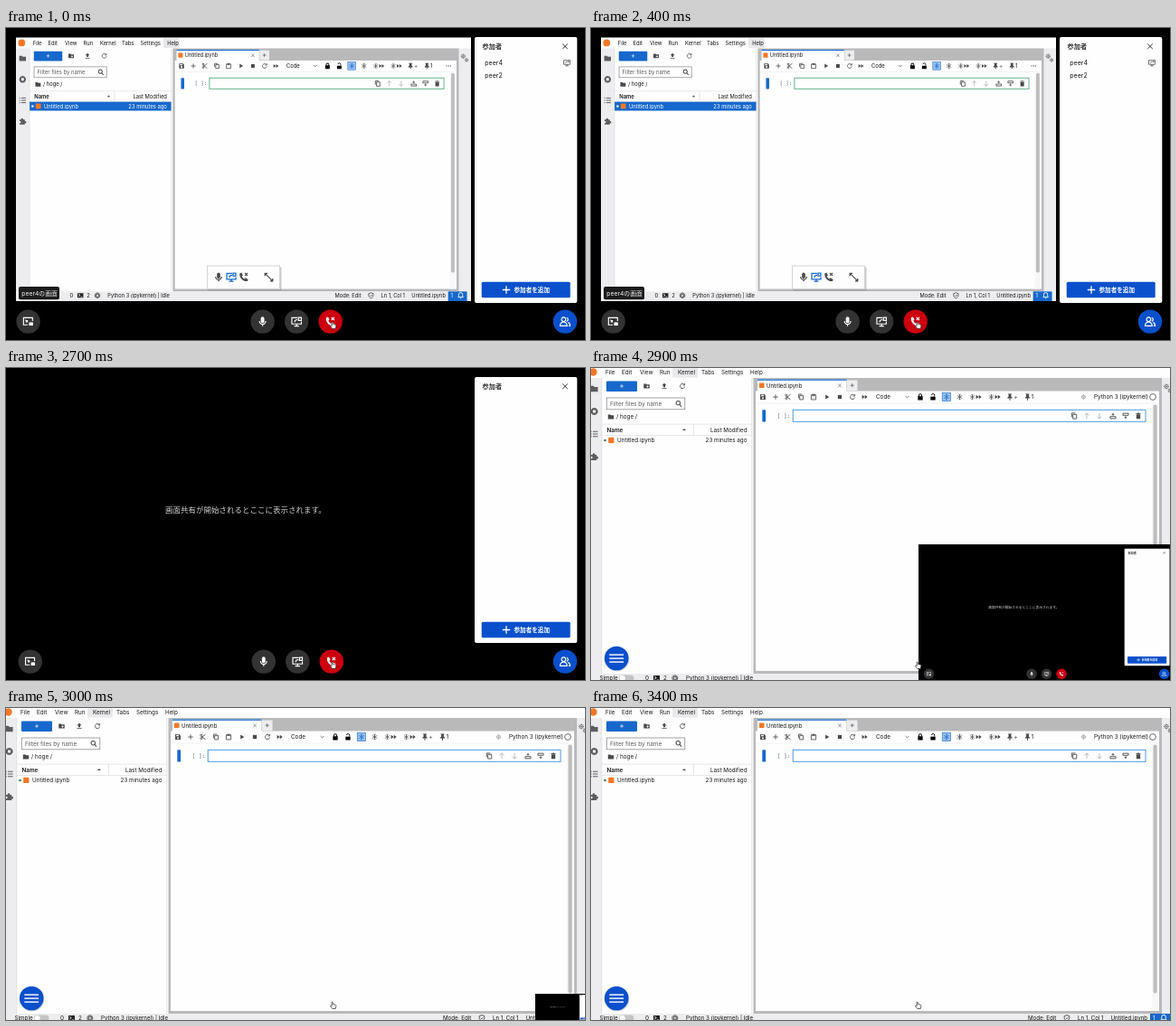
These frames come from a looping animation (640 by 345 pixels, 4 s). An HTML page:

```html
<!DOCTYPE html>
<html lang="ja">
<head>
<meta charset="utf-8">
<title>Screen sharing call</title>
<style>
html, body { margin: 0; width: 100%; height: 100%; overflow: hidden; background: #fefefe; }
svg { display: block; width: 100vw; height: 100vh; }
text { font-family: Inter, "Noto Sans CJK JP", "Noto Sans CJK", sans-serif; white-space: pre; }
#call { animation: call 4s step-end infinite; }
#win { transform-origin: 646px 349px; animation: shrink 4s step-end infinite; }
@keyframes call {
  0% { opacity: 1; }
  67.5%, 100% { opacity: 0; }
}
@keyframes shrink {
  0% { opacity: 0; transform: scale(1); }
  67.5% { opacity: 1; transform: scale(1); }
  70% { opacity: 1; transform: scale(.8436); }
  72.5% { opacity: 1; transform: scale(.44); }
  75% { opacity: 1; transform: scale(.0946); }
  77.5%, 100% { opacity: 0; transform: scale(.0946); }
}
</style>
</head>
<body>
<svg viewBox="0 0 640 345" preserveAspectRatio="none">
  <defs>
    <clipPath id="screen"><rect x="11" y="10.5" width="503" height="291.5"/></clipPath>
  </defs>
  <g id="desk"></g>
  <g id="call"></g>
  <g id="win"></g>
  <g id="hand"></g>
</svg>
<script>
const INK = '#4a4a4a', DIM = '#b4b4b4', SIDE = '#5c5c5c', TEXT = '#151515', WHITE = '#fefefe',
      PALE = '#ededf0', LINE = '#d8d8d8', GRAY = '#b9b9b9',
      BLUE = '#1668cc', DEEP = '#0a50cc', ORANGE = '#f37726';

// Icons live in a 10 unit box around the origin; "s" is stroked, "f" is filled.
const ICONS = {
  folder: { f: 'M-5-4h4l1.3 1.4h4.7v6.6h-10z' },
  addFolder: { f: 'M-5-4h4l1.3 1.4h4.7v6.6h-10zM1-1v1.3h-1.3v1.2h1.3v1.3h1.2v-1.3h1.3v-1.2h-1.3v-1.3z' },
  run: { f: 'M0-5a5 5 0 1 0 .01 0zM-2-2h4v4h-4z' },
  list: { s: 'M-2-3.5h7M-2 0h7M-2 3.5h7M-5-3.5h1.5M-5 0h1.5M-5 3.5h1.5' },
  puzzle: { f: 'M-4.5-2.5h2.3a1.6 1.6 0 1 1 3 0h2.5v2.5a1.6 1.6 0 1 1 0 3v2h-7.8v-2.3a1.5 1.5 0 1 0 0-2.8z' },
  upload: { f: 'M0-5l4 4h-2.4v3h-3.2v-3h-2.4zM-4 3.4h8v1.4h-8z' },
  refresh: { s: 'M3.2-2.4A4 4 0 1 0 4 .8M4-4.6v3h-3' },
  save: { f: 'M-4.5-4.5h7l2 2v7h-9zM-3-3.4v2.4h4.6v-2.4zM0 .2a1.6 1.6 0 1 0 .01 0z' },
  plus: { s: 'M0-4.2v8.4M-4.2 0h8.4' },
  cut: { s: 'M-3-1L4 4.5M-3 1L4-4.5M-3.4-4.3a1.5 1.5 0 1 0 .01 0M-3.4 1.3a1.5 1.5 0 1 0 .01 0' },
  copy: { s: 'M-4 2v-6.5h6M-2-2.5h6v7h-6z' },
  paste: { s: 'M-4-3.5h8v8h-8zM-2-4.4h4v2h-4z' },
  play: { f: 'M-2.8-4l6.4 4-6.4 4z' },
  stop: { f: 'M-3.3-3.3h6.6v6.6h-6.6z' },
  ff: { f: 'M-4.5-3.4l4.5 3.4-4.5 3.4zM.3-3.4l4.7 3.4-4.7 3.4z' },
  lock: { f: 'M-3.8-1h.9v-1.3a2.9 2.9 0 0 1 5.8 0v1.3h.9v6h-7.6zM-1.6-1h3.2v-1.3a1.6 1.6 0 0 0-3.2 0z' },
  unlock: { f: 'M-3.8-.5h7.6v5.5h-7.6z', s: 'M2.4-.5v-2a2.3 2.3 0 0 0-4.6-.4' },
  snow: { s: 'M0-4.6v9.2M-4-2.3l8 4.6M-4 2.3l8-4.6M-1.6-4l1.6 1.4 1.6-1.4M-1.6 4l1.6-1.4 1.6 1.4' },
  pin: { f: 'M-3-5h6v1.2h-1v3.2l1.8 1.8v1h-3.1v3h-1.4v-3h-3.1v-1l1.8-1.8v-3.2h-1z' },
  chev: { s: 'M-3-1.5l3 3 3-3' },
  caret: { f: 'M-4 2l4-4 4 4z' },
  search: { s: 'M-1-4.2a3.2 3.2 0 1 0 .01 0M1.4 1.4l3 3.2' },
  up: { s: 'M0 4.5v-9M-3.6-1l3.6-3.6 3.6 3.6' },
  down: { s: 'M0-4.5v9M-3.6 1l3.6 3.6 3.6-3.6' },
  above: { s: 'M-4.5 1h9v3.2h-9zM0-.5v-4M-2-2.5h4' },
  below: { s: 'M-4.5-1h9v-3.2h-9zM0 .5v4M-2 2.5h4' },
  trash: { f: 'M-3.2-2.4h6.4v7.2h-6.4zM-4-4.2h2.4l.6-.8h2l.6.8h2.4v1.2h-8z' },
  gear: { s: 'M0-3.2a3.2 3.2 0 1 0 .01 0M0-1a1 1 0 1 0 .01 0M0-5v1.6M0 3.4v1.6M-5 0h1.6M3.4 0h1.6M-3.5-3.5l1.1 1.1M2.4 2.4l1.1 1.1M-3.5 3.5l1.1-1.1M2.4-2.4l1.1-1.1' },
  term: { f: 'M-5-4h10v8h-10zM-3.6-2.4l2.2 2-2.2 2 .8.7 3-2.7-3-2.7zM.4 1.6v1h3v-1z' },
  chip: { s: 'M0-4a4 4 0 1 0 .01 0M-2-2h4v4h-4z' },
  shield: { s: 'M0-4.6l4 1.4v3c0 2.4-2 4-4 5-2-1-4-2.6-4-5v-3zM-1.7 0l1.4 1.4 2.4-2.7' },
  bell: { s: 'M-4 2.6h8l-1-1.6v-2.6a3 3 0 0 0-6 0v2.6zM-1 4.5h2' },
  close: { s: 'M-4-4l8 8M4-4l-8 8' },
  mic: { f: 'M-1.8-3.2a1.8 1.8 0 0 1 3.6 0v3a1.8 1.8 0 0 1-3.6 0z', s: 'M-3.3-.5a3.3 3.3 0 0 0 6.6 0M0 2.9v2' },
  share: { s: 'M1-4h-6v6.5h10v-2.5M-2.5 4.8h5M0 2.5v2.3M2-4.2h3v3h-3zM-2 .5c0-2 1-2.5 3-2.5' },
  hang: { f: 'M-4.6-4.2l2-.6 1.5 2.9-1.2 1c.6 1.4 1.6 2.4 2.9 3l1.2-1.2 2.8 1.6-.6 2c-4.6 1.2-9.6-4-8.6-8.7z', s: 'M1-4.5l3 3M4-4.5l-3 3' },
  people: { s: 'M-1.5-4.3a2.1 2.1 0 1 0 .01 0M-5 4.3c0-5 7-5 7 0zM1.6-4a2 2 0 0 1 0 3.8M3 .8c1.4.5 2 1.8 2 3.5h-1.5' },
  pip: { s: 'M4.5-.5v-3.5h-9.5v7.5h4.5M-3-1.8l2 2M-1-1.5v1.7h-1.7', f: 'M.8.8h4.2v3.4h-4.2z' },
  expand: { s: 'M-4.5-4.5l9 9M-4.5-1.5v-3h3M4.5 1.5v3h-3' }
};

const rect = (x, y, w, h, fill, more = '') =>
  `<rect x="${x}" y="${y}" width="${w}" height="${h}" fill="${fill}" ${more}/>`;
const disc = (x, y, r, fill, more = '') =>
  `<circle cx="${x}" cy="${y}" r="${r}" fill="${fill}" ${more}/>`;
const text = (x, y, s, size = 6.3, fill = TEXT, more = '') =>
  `<text x="${x}" y="${y + size * .36}" font-size="${size}" fill="${fill}" ${more}>${s}</text>`;
const group = (inner, attrs) => `<g ${attrs}>${inner}</g>`;
const END = 'text-anchor="end"', BOLD = 'font-weight="700"';

function icon(name, x, y, size = 6.5, color = INK, weight = 1.3) {
  const { s, f } = ICONS[name];
  return group(
    (f ? `<path d="${f}" fill="${color}" fill-rule="evenodd"/>` : '') +
    (s ? `<path d="${s}" fill="none" stroke="${color}" stroke-width="${weight}"/>` : ''),
    `transform="translate(${x} ${y}) scale(${size / 10})"`);
}

const row = (names, xs, y, size, color) =>
  names.split(' ').map((n, i) => icon(n, xs[i], y, size, color)).join('');

// Notebook app. pad widens the file panel, dx and dy move the right and bottom edges.
function lab({ pad = 0, dx = 0, dy = 0, shared = false }) {
  const right = 629 + dx, bottom = 337 + dy, dock = 179.5 + pad, mid = 342.8 + dy;
  const menu = [['File', 16], ['Edit', 34], ['View', 54], ['Run', 76], ['Kernel', 96],
                ['Tabs', 122], ['Settings', 144], ['Help', 176]];
  const hot = shared ? [171.5, 19] : [90, 28];

  const top = rect(-6, -4, 660, 360, WHITE) + rect(hot[0], -1, hot[1], 11.5, '#e9e9ec') +
    disc(2.5, 4.5, 4.2, ORANGE) +
    menu.map(([s, x]) => text(x, 4.8, s)).join('') +
    rect(-6, 11, 18, 340, PALE) + rect(11.6, 11, .6, 327, LINE) +
    ['folder', 'run', 'list', 'puzzle'].map((n, i) => icon(n, 3.6, 23 + 25 * i, 8, SIDE)).join('');

  const ink = shared ? '#fff' : TEXT;
  const files = rect(17, 14.5, 34, 11.5, BLUE, 'rx="1"') + icon('plus', 34, 20, 5, '#fff') +
    row('addFolder upload refresh', [61.5, 81, 101], 20) +
    rect(17.3, 33, 86.5, 12.8, '#fff', 'stroke="#8c8c8c" stroke-width=".8"') +
    text(21, 39.4, 'Filter files by name', 6.4, '#5a5a5a') + icon('search', 97, 39.4, 7, INK, 1.6) +
    icon('folder', 22, 54, 6.4) + text(28, 54, '/ hoge /') +
    rect(12, 61.8, 166 + pad, .6, LINE) + rect(12, 74.3, 166 + pad, .6, LINE) +
    rect(113, 62, .6, 12, LINE) +
    text(17.5, 68.3, 'Name', 6.3, TEXT, 'font-weight="600"') + icon('caret', 103 + pad, 68, 5) +
    text(172.5 + pad, 68.3, 'Last Modified', 6.3, TEXT, END) +
    (shared ? rect(12, 74.8, 166 + pad, 10.6, BLUE) : '') +
    disc(15.5, 80, 1.3, shared ? '#fff' : '#2f7d4a') +
    rect(19.2, 76.8, 6.2, 6.2, ORANGE, 'rx=".6"') + text(29, 80, 'Untitled.ipynb', 6.3, ink) +
    text(172.5 + pad, 80, '23 minutes ago', 6.3, ink, END) +
    rect(177.5 + pad, 11, .7, bottom - 11, LINE);

  const tools = rect(184, 12.5, 98.5, 13.5, WHITE) + rect(184, 12.5, 98.5, 1.3, BLUE) +
    rect(283, 13.5, 11.5, 11.5, PALE) +
    rect(186, 16.5, 5.5, 5.5, ORANGE, 'rx=".6"') + text(194, 19.4, 'Untitled.ipynb', 6) +
    icon('close', 275, 19.4, 4.5) + icon('plus', 288.7, 19.2, 5) +
    row('save plus cut copy paste play stop refresh ff', [190, 204, 218, 232, 246, 261, 275, 289, 302.5], 32) +
    text(315, 32, 'Code') + icon('chev', 349.5, 32, 6) +
    icon('lock', 364, 32, 7, '#000') + icon('unlock', 378, 32, 7, '#000') +
    rect(388.2, 27.2, 9.4, 9.4, '#9cc3f0', `stroke="${BLUE}" stroke-width=".6"`) +
    icon('snow', 393, 32, 7, BLUE, 1) + icon('snow', 407.5, 32, 7, INK, 1) +
    icon('snow', 421.5, 32, 6.5, INK, 1) + icon('ff', 428.5, 32, 6.5) +
    icon('snow', 442.5, 32, 6.5, INK, 1) + icon('ff', 449.5, 32, 6.5) +
    icon('pin', 463, 32, 7) + icon('plus', 469.5, 32.5, 4) +
    icon('pin', 482.5, 32, 7) + text(486.5, 32, '1');

  const edge = right - pad, cellEnd = edge - 16;
  const cell = rect(189.3, 46.3, 3.8, 13.2, BLUE, 'rx=".8"') +
    text(205.5, 53, '[ ]:', 6.2, '#56687c', 'style="font-family:\'DejaVu Sans Mono\',monospace"') +
    rect(223.2, 46.3, cellEnd - 223.2, 13, WHITE,
      `stroke="${shared ? '#58b07f' : '#4a9be0'}" stroke-width="1"`) +
    row('copy above below trash', [79, 36, 22, 8].map(d => cellEnd - d), 53, 6.8) +
    row('up down', [65, 51].map(d => cellEnd - d), 53, 6.8, DIM) +
    rect(edge - 9, 39, 6.5, bottom - 41, '#f7f7f7') +
    rect(edge - 7.5, 40.5, 4.2, 275 + dy, '#bdbdbd', 'rx="2"');

  const kernel = shared
    ? [0, 2.4, 4.8].map(d => disc(506 + d, 32, .7, INK)).join('')
    : icon('gear', 544.5, 32, 5.5, '#8f8f8f') + text(556, 32, 'Python 3 (ipykernel)') +
      disc(621, 32, 3.4, 'none', `stroke="${INK}" stroke-width=".8"`);

  const main = rect(dock, 11, right + 2 - dock, bottom + 1 - 11, GRAY) +
    rect(dock + 2.5, 25.5, right - dock - 3.5, bottom - 27.5, WHITE) +
    rect(dock + 2.5, 38.8, right - dock - 3.5, .5, '#e4e4e4') +
    group(tools + cell + kernel, `transform="translate(${pad} 0)"`) +
    rect(right + 2, 11, 20, bottom - 10, PALE) +
    icon('gear', 636 + dx, 20.5, 6, SIDE) + icon('gear', 640 + dx, 25, 5, SIDE);

  const status = rect(-6, bottom + 1, 660, 16, PALE) +
    text(9.5, mid, 'Simple', 6.3) +
    rect(31, mid - 3.2, 16.5, 7, '#c4c4c4', 'rx="3.5"') + disc(34.7, mid + .3, 3, '#fff') +
    text(60, mid, '0') + icon('term', 72.5, mid, 7, '#222') + text(80, mid, '2') +
    icon('chip', 92.8, mid, 7.5) + text(105, mid, 'Python 3 (ipykernel) | Idle', 6.1) +
    group(text(483, mid, 'Mode: Edit', 6.2) + icon('shield', 526, mid, 7) +
      text(538, mid, 'Ln 1, Col 1', 6.1) + text(574.5, mid, 'Untitled.ipynb', 6.2) +
      rect(618, bottom + 1, 22.5, 12.5, BLUE) + text(621, mid, '1', 6.3, '#fff') +
      icon('bell', 633, mid, 7.5, '#fff'), `transform="translate(${dx} 0)"`);

  return top + files + main + status;
}

const round = (name, x, fill, size = 10.5) =>
  disc(x, 324.6, 13.2, fill) + icon(name, x, 324.6, size, '#fff', 1.1);

// Call screen: dark stage, participant panel and round buttons.
function callScreen(content, members, xs) {
  const dark = '#333';
  return rect(0, 0, 640, 345, '#000') + content +
    rect(518, 10, 113.3, 294, WHITE, 'rx="2"') +
    text(526.5, 20.8, '参加者', 7.2, '#333', BOLD) + icon('close', 618, 20.3, 7, '#333', 1.4) +
    members.map((m, i) => text(529.3, 38.5 + 14 * i, m, 7)).join('') +
    (members.length ? icon('share', 620, 38.5, 7, INK, 1.1) : '') +
    rect(525.7, 280.7, 98, 17.6, DEEP, 'rx="1.5"') + icon('plus', 553, 289.5, 10, '#fff', 1.3) +
    text(561.5, 289.6, '参加者を追加', 6.6, '#fff', BOLD) +
    round('pip', xs[0], dark) + round('mic', xs[1], dark) + round('share', xs[2], dark) +
    round('hang', xs[3], '#cc000e') + round('people', 618, DEEP, 11);
}

const popup = rect(223.5, 264.5, 81, 26, '#808080', 'opacity=".4"') +
  rect(222.5, 263, 80, 25.5, WHITE, 'stroke="#d4d4d4" stroke-width="1"') +
  icon('mic', 235, 275.4, 10) + icon('share', 249, 275.4, 10, BLUE) +
  icon('hang', 263, 275.4, 10) + icon('expand', 290.5, 275.6, 9.5);

const shared = group(
  group(lab({ pad: 3.2, dx: -107, dy: -37, shared: true }), 'transform="translate(15 12.3) scale(.927)"') + popup,
  'clip-path="url(#screen)"') +
  rect(14, 286, 45, 14.3, '#1c1c1c', 'rx="2"') + text(17.3, 293.2, 'peer4の画面', 6.8, '#f2f2f2');

const notice = text(176, 157.3, '画面共有が開始されるとここに表示されます。', 8.5, '#d0d0d0');

const menuButton = disc(28.8, 322, 13.6, '#808080', 'opacity=".35"') + disc(28.2, 321, 13.3, DEEP) +
  [316.4, 320.4, 324.4].map(y => rect(20.3, y, 15.8, 1.4, '#fff')).join('');

const put = (id, html) => { document.getElementById(id).innerHTML = html; };
put('desk', lab({}) + menuButton);
put('call', callScreen(shared, ['peer4', 'peer2'], [24.6, 283.6, 321.2, 358.7]));
put('win', callScreen(notice, [], [26.8, 284.8, 322.3, 359.8]));
put('hand', `<path d="M360 325.2c.9-.4 1.3.2 1.3 1v1.2l2.7.7c.8.3 1 .9.8 1.7l-.6 2.7h-3.4l-2.2-2.7c-.3-.7.3-1.2 1-.8l.6.5v-3.4z"
  fill="#fff" stroke="#222" stroke-width=".7"/>`);
</script>
</body>
</html>
```
